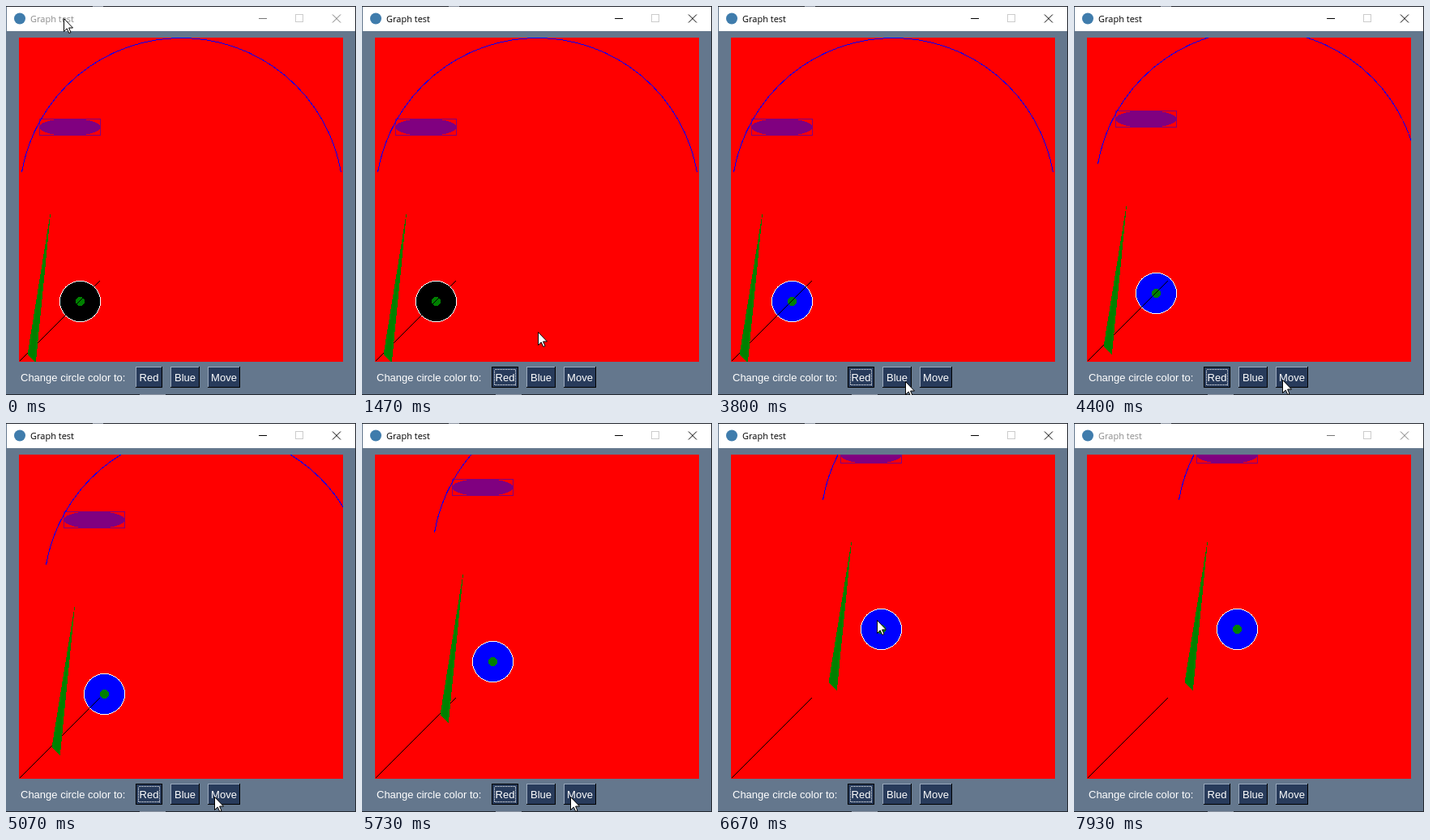
Recreate the animation shown at these times as an HTML page. Size 432 px wide and 480 px high, loop 7990 ms.

```html
<!DOCTYPE html>
<html lang="en">
<head>
<meta charset="utf-8">
<title>Graph test</title>
<style>
  html, body { margin: 0; width: 100%; height: 100%; overflow: hidden; background: #22262e; }
  svg { display: block; }
  text { font: 13px "Liberation Sans", Arial, sans-serif; fill: #fff; }
  #title { font: 11px "Open Sans", "Noto Sans", sans-serif; }
  .crisp { shape-rendering: crispEdges; }
</style>
</head>
<body>
<svg width="432" height="480" viewBox="0 0 432 480">
  <defs><clipPath id="area"><rect x="16" y="39" width="400" height="400"/></clipPath></defs>
  <g class="crisp">
    <rect width="432" height="480" fill="#22262e"/>
    <path d="M107 0h13v1h-13z M165 479h32v1h-32z" fill="#8b93a0"/>
    <rect y="1" width="431" height="478" fill="#64778d"/>
    <rect x="1" y="1" width="430" height="30" fill="#fff"/>
  </g>
  <circle cx="17" cy="15.5" r="7" fill="#3f7cac"/>
  <text id="title" x="30" y="20">Graph test</text>
  <g id="controls" fill="none">
    <path class="crisp" d="M312 15.5h10"/>
    <path class="crisp" d="M357.5 10.5h9v9h-9z" style="stroke:#ccc"/>
    <path d="M403 10.5l10 10m0-10l-10 10"/>
  </g>

  <g clip-path="url(#area)" class="crisp">
    <rect x="16" y="39" width="400" height="400" fill="red"/>
    <g class="fig">
      <circle id="disc" cx="91.5" cy="364.5" r="25" stroke="#fff"/>
      <circle cx="91.5" cy="364.5" r="5.5" fill="green"/>
      <ellipse cx="79" cy="149.5" rx="37.5" ry="10" fill="purple" stroke="purple"/>
      <rect x="41.5" y="139.5" width="75" height="20" fill="none" stroke="purple"/>
    </g>
    <path d="M16.5 438.5l99-99" stroke="#000"/>
    <g class="fig">
      <path id="arc" fill="none" stroke="#00f"/>
      <path d="M26.5 430L36.8 440L55.6 250z" fill="green"/>
    </g>
  </g>

  <text x="18" y="463">Change circle color to:</text>
  <g id="buttons"></g>
  <path id="cursor" d="M.5 .5V16.5L4.2 12.9L6.8 18.5L9 17.5L6.6 12H11.5z" fill="#fff" stroke="#000"/>
</svg>
<script>
const LOOP = 7990, FPS = 15;
const ACTIVE = [1470, 7930];
const RED_AT = 2730, BLUE_AT = 3670;

// Press and release times of each button
const CLICKS = {
  Red: [[2600, RED_AT]],
  Blue: [[3530, BLUE_AT]],
  Move: [[4270, 4400], [4730, 4870], [5000, 5070], [5130, 5200], [5330, 5400], [5470, 5530],
         [5600, 5730], [5800, 5870], [5930, 6000], [6070, 6130], [6200, 6270]]
};

// Pointer stops: arrive, leave, x, y
const STOPS = [
  [0, 870, 71, 15], [1330, 1470, 217, 402], [1730, 1800, 156, 319], [1930, 2070, 156, 332],
  [2530, 2730, 167, 449], [2800, 3070, 170, 456], [3470, 3600, 227, 456], [3800, 3800, 231, 463],
  [4130, 6270, 257, 461], [6670, 6870, 196, 243], [7000, 7270, 183, 261], [7670, LOOP, 68, 481]
];

const $ = id => document.getElementById(id);
const set = (el, attrs) => { for (const k in attrs) el.setAttribute(k, attrs[k]); };

function add(parent, tag, attrs) {
  const el = document.createElementNS('http://www.w3.org/2000/svg', tag);
  set(el, attrs);
  return parent.appendChild(el);
}

function makeButton(name, x, w) {
  const g = add($('buttons'), 'g', { class: 'crisp' });
  const h = 26, y = 445;
  add(g, 'rect', { x, y, width: w, height: h, fill: '#283b5b' });
  const light = add(g, 'path', { d: `M${x + .5} ${y + h - 1}V${y + .5}H${x + w - 1}`, fill: 'none' });
  const dark = add(g, 'path', { d: `M${x} ${y + h - .5}H${x + w - .5}V${y}`, fill: 'none' });
  const label = add(g, 'text', { x: x + w / 2, y: 463, 'text-anchor': 'middle' });
  label.textContent = name;
  const focus = add(g, 'g', { fill: 'none' });
  add(focus, 'rect', { x: x + .5, y: y + .5, width: w - 1, height: h - 1, stroke: '#000' });
  add(focus, 'rect', { x: x + 3.5, y: y + 3.5, width: w - 7, height: h - 7, stroke: '#fff', 'stroke-dasharray': '1 1' });
  return { name, light, dark, label, focus };
}

const buttons = [['Red', 160, 33], ['Blue', 203, 36], ['Move', 249, 40]].map(b => makeButton(...b));
const figures = document.querySelectorAll('.fig');

const rad = 10 * Math.PI / 180;
const dx = 200 * Math.cos(rad), ay = 239.5 - 200 * Math.sin(rad);
set($('arc'), { d: `M${216.5 - dx} ${ay}A200 200 0 0 1 ${216.5 + dx} ${ay}` });

function pointer(t) {
  const i = STOPS.findIndex((s, k) => k === STOPS.length - 1 || t < STOPS[k + 1][0]);
  const [, leave, x, y] = STOPS[i], next = STOPS[i + 1];
  if (!next || t <= leave) return [x, y];
  const u = (t - leave) / (next[0] - leave), e = u * u * (3 - 2 * u);
  return [x + (next[2] - x) * e, y + (next[3] - y) * e].map(Math.round);
}

function draw(t) {
  const active = t >= ACTIVE[0] && t < ACTIVE[1];
  $('title').style.fill = active ? '#000' : '#8c8c8c';
  set($('controls'), { stroke: active ? '#000' : '#777' });

  const shift = 10 * CLICKS.Move.filter(c => t >= c[1]).length;
  figures.forEach(f => set(f, { transform: `translate(${shift} ${-shift})` }));
  set($('disc'), { fill: t >= BLUE_AT ? '#00f' : t >= RED_AT ? 'red' : '#000' });

  for (const b of buttons) {
    const down = CLICKS[b.name].some(([p, r]) => t >= p && t < r);
    set(b.light, { stroke: down ? '#000' : '#9aa9bd' });
    set(b.dark, { stroke: down ? '#9aa9bd' : '#000' });
    set(b.label, { transform: down ? 'translate(1 1)' : '' });
    set(b.focus, { visibility: active && b.name === 'Red' ? 'visible' : 'hidden' });
  }

  // The pointer is sampled at a low, fixed rate
  const step = Math.floor((t + 4) * FPS / 1000) * 1000 / FPS;
  set($('cursor'), { transform: `translate(${pointer(step + 4)})` });
}

const start = performance.now();
function tick() {
  draw((performance.now() - start) % LOOP);
  requestAnimationFrame(tick);
}
tick();
</script>
</body>
</html>
```
